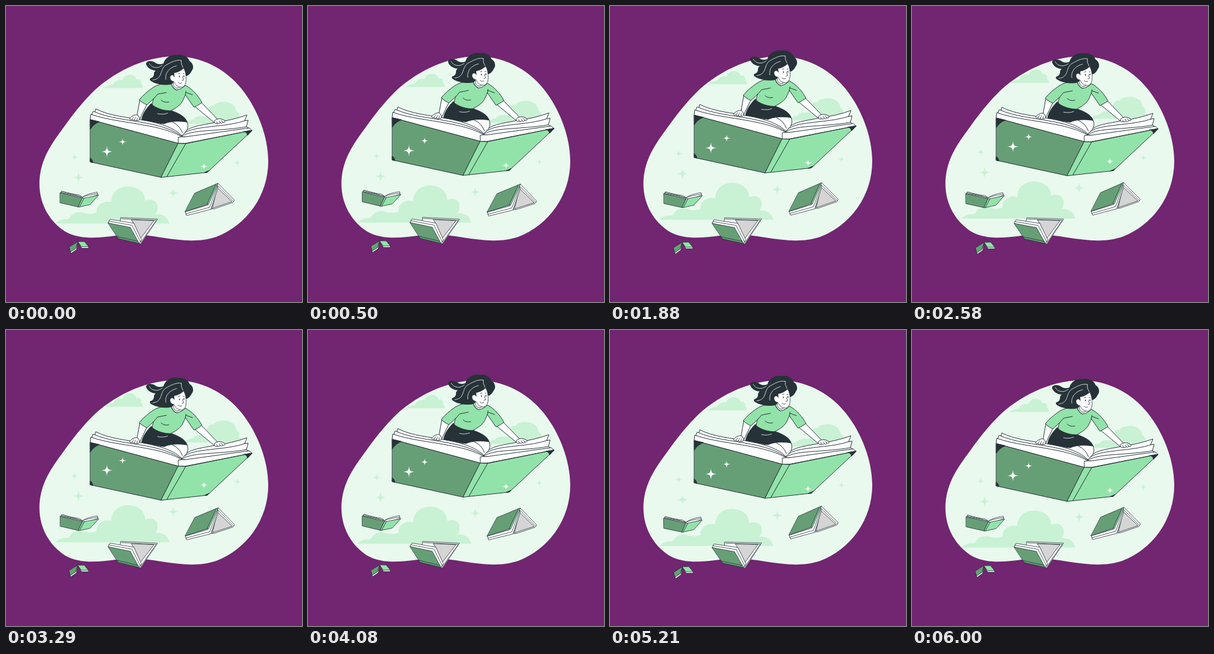
These frames come from a looping animation (500 by 500 pixels, 6040 ms). An HTML page:

```html
<!DOCTYPE html>
<html lang="en">
<head>
<meta charset="utf-8">
<title>Flying book</title>
<style>
  html, body { margin: 0; width: 100%; height: 100%; overflow: hidden; background: #722570; }
  svg { display: block; width: 100vw; height: 100vh; }
  .ink { stroke: #263238; stroke-width: 1; stroke-linejoin: round; stroke-linecap: round; }
  .thin { stroke-width: .8; }
  .line { fill: none; }
  .white { fill: #fff; }
  .green { fill: #92e3a9; }
  .deep { fill: #669f76; }
  .pale { fill: #c9f1d4; }
  .grey { fill: #d5d5d5; }
  .dark { fill: #263238; }
  .strand { fill: none; stroke: #fff; stroke-width: .8; stroke-linecap: round; }
</style>
</head>
<body>
<svg viewBox="0 0 500 500" xmlns="http://www.w3.org/2000/svg">
  <path fill="#e9f9ee" d="M56.500 301C56.500 269 69 246 83 225C103 197 121 171 145 147C178 114 232 85 286 85C328 85 369 104 398 140C426 175 443 222 443 262C443 320 407 370 355 390C325 400 295 396 262 391C235 386 210 385 185 388C155 392 125 395 100 381C75 365 56.500 336 56.500 301Z"/>

  <g id="sky" class="pale">
    <path d="M83 367.500C88 363 94 360 101 360C104 361 106 359 108 357C112 349 124 346 133 350C141 352 147 351 153 349C152 337 163 328 178 331C178 315 190 305 206 305C222 305 235 314 235 329C247 324 258 331 256 342C256 347 254 350 251 352C262 350 272 355 275 365L276 367.500Z"/>
    <path d="M164 138.500C170 135 175 133 181 133C183 127 190 123 197 125C199 114 219 113 220 124C226 122 230 127 228 132C231 133 231 136 231 138.500Z"/>
    <path d="M302 199C306 193 313 193 317 191C320 186 331 185 338 187C337 176 343 166 350 169C353 164 360 162 368 162C380 162 389 169 389 178C394 180 397 187 392 190C399 190 401 194 402 199Z"/>
  </g>

  <g id="flock" class="ink thin">
    <!-- open book -->
    <path class="white" d="M92 317L94 312.500Q112 318 123 319Q127 321 129 323Q134 318 154 314.500L155 319L131 327Z"/>
    <path class="line" d="M92 315.500Q114 319 129 323Q138 319 155 317M93 314Q112 317 129 323"/>
    <path class="deep" d="M91.500 315.500L129 324.500L122 339.500L91.500 332.500Z"/>
    <path class="green" d="M132 324.500L156.500 319.500L142 335.500L124 339.500Z"/>
    <path class="green" d="M129 324.500L132 324.500L124 339.500L122 339.500Z"/>
    <!-- tent book -->
    <path class="white" d="M358 299.500L386 328L383 332L352 342.500L347 343Z"/>
    <path class="line" d="M357 303L384.500 330"/>
    <path class="grey" d="M357 307L382 330.500L349 341.500Z"/>
    <path class="white" d="M303 348L305 354L346 343.500L358 307L356 302L341 336Z"/>
    <path class="line" d="M304 351L344 340L357 305"/>
    <path class="deep" d="M319 316L355.500 300.500L340 335L302.500 347.500Z"/>
    <path class="green" d="M355.500 300.500L358 299.500L342.500 334.500L340 335Z"/>
    <!-- leaning book -->
    <path class="white" d="M194 357.500L256 360L227.500 402L190 393Z"/>
    <path class="line" d="M195 359.500L254 362L227 400"/>
    <path class="grey" d="M212 361L250 362.500L227 393L216 368Z"/>
    <path class="white" d="M176 360.500L216 367L229 395L225 401L173 366Z"/>
    <path class="line" d="M174 363.500L213 370.500L227 398"/>
    <path class="deep" d="M172.500 366.500L210 374L225 401L190 393Z"/>
    <path class="line" d="M188 389.500L223 397.500"/>
    <!-- far book -->
    <path class="white" d="M109 415L109.500 418L119 411.500L122 400L118 409ZM122 399L128 409L139.500 409L139.500 406Z"/>
    <path class="deep" d="M107 407L121.500 398L118 409.500L109 415.500Z"/>
    <path class="green" d="M121.500 398L132.500 398L139.500 406.500L128 406.500Z"/>
  </g>

  <g id="ride" class="ink">
    <!-- right pages -->
    <path class="white" d="M297 219C305 203 328 202 352 197Q382 193 407 184L403 194L409 193L406 204L411 207L303 232L297 224Z"/>
    <path class="line" d="M297 219C306 207 330 206 352 203Q385 200 403 194M297 220C310 211 340 211 362 209Q390 207 406 204"/>

    <!-- skirt and leg -->
    <path class="white" d="M258 200C272 193 295 191 306 196C309 205 306 211 300 216L297 219Z"/>
    <path class="line" d="M281 196Q293 201 298 214"/>
    <path class="dark" d="M245 165C236 174 230 184 229 193L267 199C278 194 292 194 306 196C303 187 292 181 277 176Z"/>
    <path class="strand" d="M256 182Q266 184 273 181"/>

    <!-- forearms -->
    <path class="white" d="M226 159L221 187L226 191L238 166Z"/>
    <path class="white" d="M318 169L352 197L358 192L330 163Z"/>

    <!-- shirt and neck -->
    <path class="green" d="M279 131C267 130 257 132 248 138C239 144 231 151 225 158.500C229 162 233 165 238 167L250 156C247 160 248 164 247 167C256 174 268 177 278 177C286 173 296 167 299 159C301 155 302 152 303 150L317.500 171C322 169 327 166 331 163C325 152 315 140 303 134C299 138 294 141 288 142C284 140 281 136 279 131Z"/>
    <path class="line" d="M250 156L256 149L271 146M262 159Q267 164 275 162M303 150L304 144M304 146L315 150"/>
    <path class="white" stroke="none" d="M282 126L282 133Q284 138 288 139Q293 138 296 135Z"/>
    <path class="line thin" d="M279 131Q281 140 288 142M282.500 129Q282 136 288 139Q293 138 295 136"/>

    <!-- head -->
    <path class="dark" stroke="none" d="M266 97C269 86 281 81 290 83C300 81 308 87 310 93C316 96 318 105 314 109C312 113 310 116 306 118L301 118L285 125C283 130 280 133 275 133C265 134 254 132 247 128C243 126 242 124 244 122C249 121 250 117 250 114C250 111 252 110 253 109C244 109 237 102 236.500 97C238 92 246 92 251 95C256 99 261 99 266 97Z"/>
    <path class="white thin" d="M284 113C290 112 296 109 300 105C303 109 305 118 304 128C303 134 299 138 295 137C289 136 286 133 284 128C277 127 275 119 279 117C282 116 283 117 284 119Z"/>
    <path class="line thin" d="M298 119L300 125L297 126M290.500 129Q293 132 297 130M291 114.500L294 113.500M299 114L301 114"/>
    <ellipse class="dark" stroke="none" cx="293" cy="119" rx=".8" ry="1.500"/>
    <ellipse class="dark" stroke="none" cx="300.500" cy="118.500" rx=".8" ry="1.500"/>
    <path class="strand" d="M242 97C245 104 256 107 264 100M248 125C266 123 259 107 270 100C279 95 288 90 296 92M270 124C268 113 276 104 288 101M296 92Q295 98 299 104"/>

    <!-- left pages -->
    <path class="white" d="M152 174C175 186 207 188 232 193C262 198 286 207 297 219L291 232L149 185Z"/>
    <path class="white" d="M147.500 178C175 190 207 192 232 197C262 202 284 210 297 220L291 232L144 187Z"/>
    <path class="white" d="M143.500 183C172 193 207 196 232 201C262 206 284 213 297 221L303 221L303 232L291 232L142.500 192Z"/>
    <path class="white" d="M297 221L303 221L411 206L415 210L303 232L291 232L291 222Z"/>

    <!-- covers -->
    <path class="deep" d="M142.500 192L291 232L262 289.500L142.500 263.500Z"/>
    <path class="green" d="M303.500 232.500L416 210L340 281L271.500 288.500Z"/>
    <path class="green" d="M291 232L303.500 232.500L271.500 288.500L262 289.500Z"/>
    <path class="dark" d="M142.500 192L158 195.500Q148 199 142.500 208ZM142.500 257Q146 259 147 264.500L142.500 263.500ZM402 212L416 210L408 218.500Q407 213 402 212ZM335 281.500L340 281L343 278Z"/>

    <!-- hands -->
    <path class="white" d="M222 184C217 183 212 186 209 190Q210 194 213 191Q214 195 217 192Q219 196 221 193Q225 195 226 190Z"/>
    <path class="line thin" d="M213 191L216 187M217 192L219 188M221 193L222 189"/>
    <path class="white" d="M353 193C358 189 365 190 370 194Q370 198 366 196Q365 200 362 197Q360 200 357 198Q353 200 352 196Z"/>
    <path class="line thin" d="M366 196L363 193M362 197L360 194M357 198L356 195"/>
  </g>

  <g id="glow" class="white"></g>
</svg>
<script>
  const LOOP = 6040, FPS = 24, LAST = 144;
  const $ = id => document.getElementById(id);
  const sky = $('sky'), flock = $('flock'), ride = $('ride'), glow = $('glow');

  function star(parent, x, y, r) {
    const el = document.createElementNS('http://www.w3.org/2000/svg', 'path');
    el.setAttribute('d', 'M0-1C.05-.2.2-.05 1 0C.2.05.05.2 0 1C-.05.2-.2.05-1 0C-.2-.05-.05-.2 0-1Z');
    el.setAttribute('transform', `translate(${x} ${y}) scale(${r})`);
    parent.append(el);
  }
  [[116, 255.5, 7], [122.5, 289.5, 10.5], [282.5, 316, 10], [391, 265, 6.5]].forEach(s => star(sky, ...s));
  [[170.5, 246, 10], [197, 229.5, 6.5], [334.5, 271, 6.5]].forEach(s => star(glow, ...s));

  // Linear rise from 0 to 1 and back over one period.
  const rise = (t, period) => 1 - Math.abs(1 - 2 * (t / period % 1));
  // Linear sway: 0, 1 at a quarter, -1 at three quarters, 0.
  const sway = p => p < .25 ? p * 4 : p < .75 ? 2 - p * 4 : p * 4 - 4;

  const lift = (el, y) => el.setAttribute('transform', `translate(0 ${-y})`);

  function draw(ms) {
    const step = Math.min(LAST, Math.floor(ms * FPS / 1000 + .13));
    const t = step / FPS;
    lift(sky, 10 * rise(t, 6));
    lift(glow, 10 * rise(t, 6));
    lift(ride, 10 * rise(t, 3));
    flock.setAttribute('transform', `rotate(${sway(t / 3 % 1)} 239 359)`);
  }

  const start = performance.now();
  function tick() {
    draw((performance.now() - start) % LOOP);
    requestAnimationFrame(tick);
  }
  tick();
</script>
</body>
</html>
```
